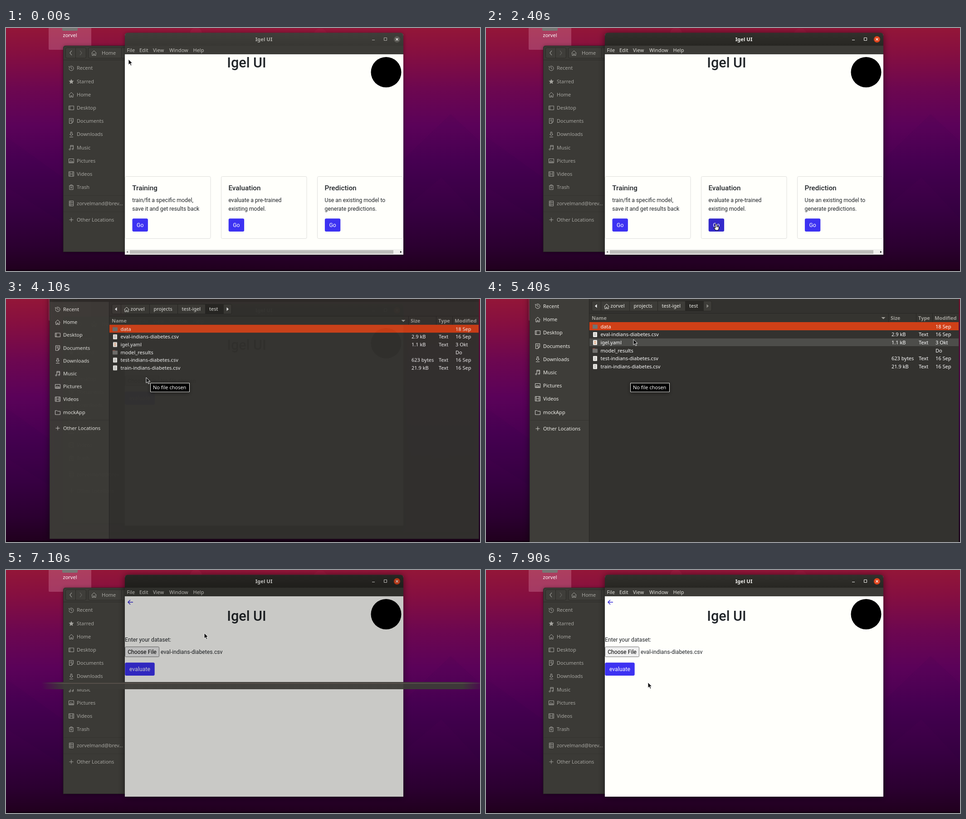
Recreate the animation shown at these times as an HTML page with a canvas. Size 1045 px wide and 536 px high, loop 8 s.

```html
<!DOCTYPE html>
<html lang="en">
<head>
<meta charset="utf-8">
<title>Igel UI</title>
<style>
html, body { margin: 0; width: 100%; height: 100%; overflow: hidden; background: #22001f; }
canvas { display: block; }
</style>
</head>
<body>
<canvas id="stage" width="1045" height="536"></canvas>
<script>
const W = 1045, H = 536, LOOP = 8000, STEP = 100;
const screen = document.getElementById('stage').getContext('2d');
const sheet = document.createElement('canvas');
const PAD = 50;
sheet.width = W;
sheet.height = H + 2 * PAD;
let g = screen;

const UI = '"Noto Sans", "Open Sans", sans-serif';
const WEB = 'Roboto, Arial, sans-serif';
const INK = '#212529', BLUE = '#3d32f2', PAPER = '#fffffb';

const ring = (x, y) => `M${x} ${y}a1.5 1.5 0 1 1-3 0a1.5 1.5 0 1 1 3 0`;
const icons = {
  clock: 'M1 6a5 5 0 1 0 2-4M1 1v3h3M6 3v3l2 1.5',
  star: 'M6 .5L7.6 4.2l4 .3-3 2.7.9 4L6 9.2l-3.5 2 .9-4-3-2.7 4-.3z',
  home: 'M.5 6.5L6 1l5.5 5.5M2 6v5.5h3V8h2v3.5h3V6',
  desk: 'M.5 2h11v8.5h-11zM3 2v8.5',
  doc: 'M1.5 .5h9v7l-3.5 4h-5.5zM3.5 3.5h5M3.5 6h5M7 11V8h3',
  down: 'M4.5 .5h3v5h2L6 9 2.5 5.5h2zM2 11.5h8',
  music: 'M4 9.5V1h6.5v7.5M4 3h6.5' + ring(4, 9.8) + ring(10.5, 8.8),
  pic: 'M.5 1.5h11v9h-11zM2 9l2.5-4 2 2.5L8 6l2 3z',
  film: 'M.5 1h11v10h-11zM3 1v10M9 1v10M3 6h6',
  trash: 'M1 3h10M4 3V1h4v2M2 3v8.5h8V3M5 5v4M7 5v4',
  server: 'M1.5 .5h9v11h-9zM1.5 4h9M1.5 8h9M3.5 2.3h2M3.5 6h2M3.5 9.8h2',
  plus: 'M6 1.5v9M1.5 6h9',
  folder: 'M.5 2h4l1.5 1.5h5.5v7.5H.5z'
};
const places = [['clock', 'Recent'], ['star', 'Starred'], ['home', 'Home'], ['desk', 'Desktop'],
  ['doc', 'Documents'], ['down', 'Downloads'], ['music', 'Music'], ['pic', 'Pictures'], ['film', 'Videos']];
const files = [
  ['dir', 'data', '', '', '18 Sep'],
  ['csv', 'eval-indians-diabetes.csv', '2.9 kB', 'Text', '16 Sep'],
  ['yaml', 'igel.yaml', '1.1 kB', 'Text', '3 Okt'],
  ['dir', 'model_results', '', '', 'Do'],
  ['csv', 'test-indians-diabetes.csv', '623 bytes', 'Text', '16 Sep'],
  ['csv', 'train-indians-diabetes.csv', '21.9 kB', 'Text', '16 Sep']
];
const ROW0 = 51.4, ROW = 17.65;

// Pointer moves: first step, last step, x, y
const moves = [
  [200, 300, 382, 163], [1100, 1200, 471, 338], [1600, 1700, 517, 434], [1900, 1900, 516, 433],
  [2100, 2100, 500, 432], [2400, 2400, 507, 432], [2500, 2500, 505, 433], [2800, 2900, 471, 302],
  [3300, 3600, 309, 173], [4300, 4500, 318, 157], [5100, 5400, 325, 89], [5500, 5700, 308, 77],
  [5900, 6000, 314, 78], [6400, 6500, 336, 86], [6600, 6700, 437, 139], [7800, 7900, 357, 248]
];

function rect(x, y, w, h, fill, r = 0, stroke) {
  g.beginPath();
  g.roundRect(x, y, w, h, r);
  if (fill) { g.fillStyle = fill; g.fill(); }
  if (stroke) { g.strokeStyle = stroke; g.lineWidth = 1; g.stroke(); }
}

function disc(x, y, r, fill) {
  g.beginPath();
  g.arc(x, y, r, 0, 7);
  g.fillStyle = fill;
  g.fill();
}

// y is the middle of the capitals
function text(s, x, y, { size = 11, color = '#fff', font = UI, weight = 400, align = 'left' } = {}) {
  g.font = `${weight} ${size}px ${font}`;
  g.fillStyle = color;
  g.textAlign = align;
  g.fillText(s, x, y + size * 0.36);
}

const web = (s, x, y, more) => text(s, x, y, { size: 12.24, font: WEB, color: INK, ...more });

function path(d, x, y, { fill, stroke, width = 1 }) {
  const p = new Path2D(d);
  g.save();
  g.translate(x, y);
  g.lineWidth = width;
  if (fill) { g.fillStyle = fill; g.fill(p); }
  if (stroke) { g.strokeStyle = stroke; g.stroke(p); }
  g.restore();
}

const icon = (name, x, y, color) =>
  path(icons[name], Math.round(x - 6), Math.round(y - 6), name === 'star' ? { fill: color } : { stroke: color });

function shadowed(blur, alpha, draw) {
  g.save();
  g.shadowColor = `rgba(0,0,0,${alpha})`;
  g.shadowBlur = blur;
  g.shadowOffsetY = 1;
  draw();
  g.restore();
}

function ramp(x0, y0, x1, y1, stops) {
  const grad = g.createLinearGradient(x0, y0, x1, y1);
  stops.forEach(([at, color]) => grad.addColorStop(at, color));
  return grad;
}

function pointer(t) {
  let x = 270, y = 69;
  for (const [from, to, tx, ty] of moves) {
    if (t < from) break;
    const k = Math.min(1, (t - from + STEP) / (to - from + STEP));
    x += (tx - x) * k;
    y += (ty - y) * k;
  }
  return { x, y };
}

function drawPointer({ x, y }, hand) {
  if (hand) {
    path('M-1.5 1Q0-1 1.5 1V5Q6 5 6.5 7V10L5 14H-1L-4.5 9Q-4.5 7-1.5 9Z', x, y,
      { fill: '#fff', stroke: '#000', width: 1.1 });
    path('M1.5 5v3M4 6v2.5', x, y, { stroke: '#000', width: 0.8 });
  } else {
    path('M0 0V12.2L2.9 9.6 5 14.2 7.1 13.2 5 8.8H8.8Z', x, y, { fill: '#111', stroke: '#fff', width: 0.9 });
  }
}

function wallpaper() {
  rect(0, 0, W, H, ramp(0, 0, 0, H, [[0, '#931638'], [0.1, '#860f40'], [0.25, '#6d0750'],
    [0.4, '#5b0259'], [0.55, '#490052'], [0.75, '#370042'], [0.9, '#2b0030'], [1, '#20001d']]));
  path('M876 290L980 190 1045 250V420L960 330 876 400Z M0 240L126 330V430L0 350Z',
    0, 0, { fill: 'rgba(20,0,50,.04)' });
  disc(419, 12, 13, 'rgba(255,90,140,.08)');
  disc(693, 16, 15, 'rgba(255,90,140,.06)');
  rect(0, 533, W, 3, 'rgba(0,0,0,.4)');
}

function desktopIcon() {
  rect(94, -4, 94, 52, 'rgba(255,190,215,.24)', 2);
  rect(124, -6, 34, 12, '#777674', 2);
  text('zorvel', 141, 16, { align: 'center' });
}

function fileManager() {
  const dim = '#a5a49f';
  shadowed(8, 0.4, () => rect(126, 39, 300, 455, '#3b3a36', [5, 5, 0, 0]));
  rect(126.5, 39.5, 300, 454, null, [5, 5, 0, 0], '#2b2a27');
  rect(127, 70, 140, 1, '#2b2a27');
  rect(131.5, 43.5, 45, 23, '#3f3e3a', 3, '#2a2926');
  rect(153, 44, 1, 23, '#2a2926');
  path('M145 50l-4 5 4 5', 0, 0, { stroke: dim, width: 1.2 });
  path('M163 50l4 5-4 5', 0, 0, { stroke: '#686762', width: 1.2 });
  rect(181.5, 43.5, 90, 23, '#3f3e3a', 3, '#2a2926');
  rect(254, 44, 1, 23, '#2a2926');
  icon('home', 194, 55, dim);
  text('Home', 211, 55, { color: dim });
  const row = (name, label, y) => {
    icon(name, 143.5, y, dim);
    text(label, 156, y, { color: dim });
  };
  [...places, ['trash', 'Trash']].forEach(([name, label], i) => row(name, label, 88.5 + 29.2 * i));
  rect(127, 369, 135, 1, '#353430');
  row('server', 'zorvelmand@brev...', 387);
  rect(127, 405, 135, 1, '#353430');
  row('plus', 'Other Locations', 423);
}

function frame(active) {
  const ink = active ? '#f4f4f0' : '#b0afa9';
  shadowed(active ? 15 : 10, active ? 0.55 : 0.4, () => rect(262, 11, 614, 489, PAPER, [6, 6, 0, 0]));
  rect(262, 10.5, 614, 28.5, active
    ? ramp(0, 11, 0, 39, [[0, '#31302c'], [1, '#272622']])
    : ramp(0, 11, 0, 39, [[0, '#3f3e3a'], [1, '#383733']]), [6, 6, 0, 0]);
  rect(262, 39, 614, 19, '#3c3b37');
  text('Igel UI', 568.5, 25, { size: 11.3, weight: 700, color: ink, align: 'center' });
  rect(807, 26, 6, 1, ink);
  rect(833.5, 21.5, 6, 6, null, 0, ink);
  disc(862, 25, 7, active ? '#e0441c' : '#595853');
  path('M859.5 22.5l5 5m0-5l-5 5', 0, 0, { stroke: '#fff', width: 1.1 });
  [['File', 266.5], ['Edit', 294], ['View', 324], ['Window', 360], ['Help', 412.5]]
    .forEach(([s, x]) => text(s, x, 49, { color: active ? '#e3e2dc' : '#c3c2bc' }));
  disc(838, 97.5, 33.5, '#000');
}

function button(label, x, y, w, fill = BLUE) {
  rect(x + 0.3, y + 0.3, w - 0.6, 28.6, fill, 3);
  web(label, x + w / 2, y + 14.3, { color: '#fff', align: 'center' });
}

const heading = y => web('Igel UI', 530.5, y, { size: 30.6, weight: 500, align: 'center' });

function homePage(hover) {
  heading(76);
  [['Training', 'train/fit a specific model,', 'save it and get results back'],
    ['Evaluation', 'evaluate a pre-trained', 'existing model.'],
    ['Prediction', 'Use an existing model to', 'generate predictions.']
  ].forEach(([title, a, b], i) => {
    const x = 262.5 + 212.2 * i;
    rect(Math.floor(x) + 0.5, 327.5, 188.5, 137, null, 3, '#dededb');
    web(title, x + 15.7, 352.5, { size: 15.3, weight: 500 });
    web(a, x + 15.7, 380);
    web(b, x + 15.7, 398.3);
    button('Go', x + 15.7, 420, 35, hover && i === 1 ? '#342acb' : BLUE);
  });
  rect(262, 488, 614, 12, '#f1f1ee');
  rect(273, 490, 581, 8, '#bdbdba');
  path('M269 491.5v5l-3.5-2.5z', 0, 0, { fill: '#777' });
  path('M869 491.5v5l3.5-2.5z', 0, 0, { fill: '#222' });
}

function evaluatePage(chosen, field) {
  path('M280 71h-11M274 66l-5 5 5 5', 0, 0, { stroke: '#3b2fd8', width: 1.5 });
  heading(100.5);
  web('Enter your dataset:', 262, 153.5);
  rect(262.5, 169.5, 75, 22, field, 2, '#767676');
  web('Choose File', 300, 180.5, { color: '#000', align: 'center' });
  web(chosen ? 'eval-indians-diabetes.csv' : 'No file chosen', 341, 180.5);
  button('evaluate', 262, 204, 66);
}

function fileIcon(kind, y) {
  if (kind === 'dir') {
    rect(235, y - 5, 6, 4, '#a3483c', 1);
    rect(235, y - 4, 11, 9, '#73726f', 1);
    return;
  }
  rect(236, y - 5.5, 9, 11, '#f3f2ee', 1);
  const ink = kind === 'yaml' ? '#d07a45' : '#9a9994';
  [-2.5, 0, 2.5].forEach(d => rect(238, y + d - 0.5, 5, 1, ink));
}

function dialog(selected, hovered, fresh) {
  const line = '#282724', soft = '#a19f99';
  rect(96, -37, 946.5, 574.5, '#33322f', [6, 6, 0, 0]);
  rect(96, -37, 946.5, 36, '#2d2c29', [6, 6, 0, 0]);
  [[103, 56], [951, 20], [978, 58]].forEach(([x, w]) => rect(x + 0.5, -30, w, 24, '#393834', 3, line));
  rect(97, -1, 130, 538, '#3e3d39');
  rect(227, -1, 1, 538, line);

  const side = (name, label, y) => {
    icon(name, 113.5, y, '#d6d5d0');
    text(label, 126, y, { color: '#eeede8' });
  };
  [...places.filter(p => p[0] !== 'star'), ['folder', 'mockApp']]
    .forEach(([name, label], i) => side(name, label, 16 + 29.2 * i));
  rect(97, 267, 130, 1, '#353430');
  side('plus', 'Other Locations', 285.7);

  rect(233.5, 4.5, 264, 22, '#3d3c38', 3, line);
  rect(439, 5, 40, 21, '#292825');
  [253, 316, 378, 439, 479].forEach(x => rect(x, 5, 1, 21, line));
  path('M244.5 11.5v8l-4.5-4z', 0, 0, { fill: '#eee' });
  path('M486.5 11.5v8l4.5-4z', 0, 0, { fill: fresh ? '#eee' : '#8d8c87' });
  icon('home', 265.5, 15.5, '#e6e5e0');
  [['zorvel', 274.5], ['projects', 325.5], ['test-igel', 387.5], ['test', 448]]
    .forEach(([s, x]) => text(s, x, 15.5, { color: '#f0efea' }));

  rect(228, 31, 814, 20, '#353430');
  rect(228, 31, 814, 1, line);
  [887, 948, 984].forEach(x => rect(x, 32, 1, 19, line));
  [['Name', 233], ['Size', 892], ['Type', 953], ['Modified', 989]]
    .forEach(([s, x]) => text(s, x, 41.7, { weight: 700, color: soft }));
  path('M871.5 40h9l-4.5 4.5z', 0, 0, { fill: soft });

  const edge = i => Math.round(ROW0 + ROW * i);
  files.forEach(([kind, name, size, type, date], i) => {
    const y = ROW0 + ROW * (i + 0.5) + 0.5;
    const fill = i === selected ? '#d04017' : i === hovered ? '#4d4d4a' : null;
    if (fill) rect(228, edge(i), 814, edge(i + 1) - edge(i), fill);
    fileIcon(kind, y);
    [[name, 252.5], [size, 894], [type, 954], [date, 991]].forEach(([s, x]) => text(s, x, y));
  });
}

function showDialog(t, at) {
  const hovered = t >= 5100 ? Math.floor((at.y - ROW0) / ROW) : -1;
  g = sheet.getContext('2d');
  g.setTransform(1, 0, 0, 1, 0, 0);
  g.clearRect(0, 0, W, sheet.height);
  g.translate(0, PAD);
  dialog(t < 6200 ? 0 : 1, hovered, t < 4400);
  g = screen;
  const [scale, alpha] = t < 4200 ? [0.971, 0.945] : t < 7000 ? [1, 1] : [0.5, 0.9];
  shadowed(14, 0.6, () => {
    g.globalAlpha = alpha;
    g.translate(0, 250);
    g.scale(1, scale);
    g.drawImage(sheet, 0, -250 - PAD);
  });
}

function closingSliver() {
  const fade = (c, a) => [[0, `rgba(${c},0)`], [0.05, `rgba(${c},${a})`], [0.96, `rgba(${c},${a})`], [1, `rgba(${c},0.2)`]];
  rect(78, 247, 967, 16, ramp(78, 0, 1045, 0, fade('60,59,55', 0.95)));
  rect(78, 249, 967, 2, ramp(78, 0, 1045, 0, fade('98,88,82', 0.7)));
}

function tooltip() {
  shadowed(8, 0.5, () => rect(318, 185, 87, 21, '#000'));
  rect(318.5, 185.5, 86, 19.5, '#000', 0, '#f4f4f0');
  text('No file chosen', 324, 195.2);
}

function fieldColor(t) {
  if (t < 3600 || t >= 7000) return '#efefef';
  return t >= 3800 && t < 3900 ? '#f5f5f5' : '#e5e5e5';
}

function draw(t) {
  const at = pointer(t);
  wallpaper();
  desktopIcon();
  fileManager();
  frame(t >= 2400);
  if (t < 2500) homePage(t >= 1900);
  else evaluatePage(t >= 7000, fieldColor(t));

  const shade = t < 4100 || t >= 7300 ? 0 : t >= 7200 ? 0.1 : 0.21;
  if (shade) rect(262, 11, 614, 489, `rgba(0,0,0,${shade})`, [6, 6, 0, 0]);
  if (t >= 4100 && t < 7100) showDialog(t, at);
  if (t >= 7100 && t < 7200) closingSliver();
  if (t >= 4100 && t < 7000) tooltip();
  drawPointer(at, t >= 1900 && t < 2500);
}

const start = performance.now();
function tick() {
  const t = (performance.now() - start) % LOOP;
  draw(Math.floor(t / STEP) * STEP);
  requestAnimationFrame(tick);
}
tick();
</script>
</body>
</html>
```
